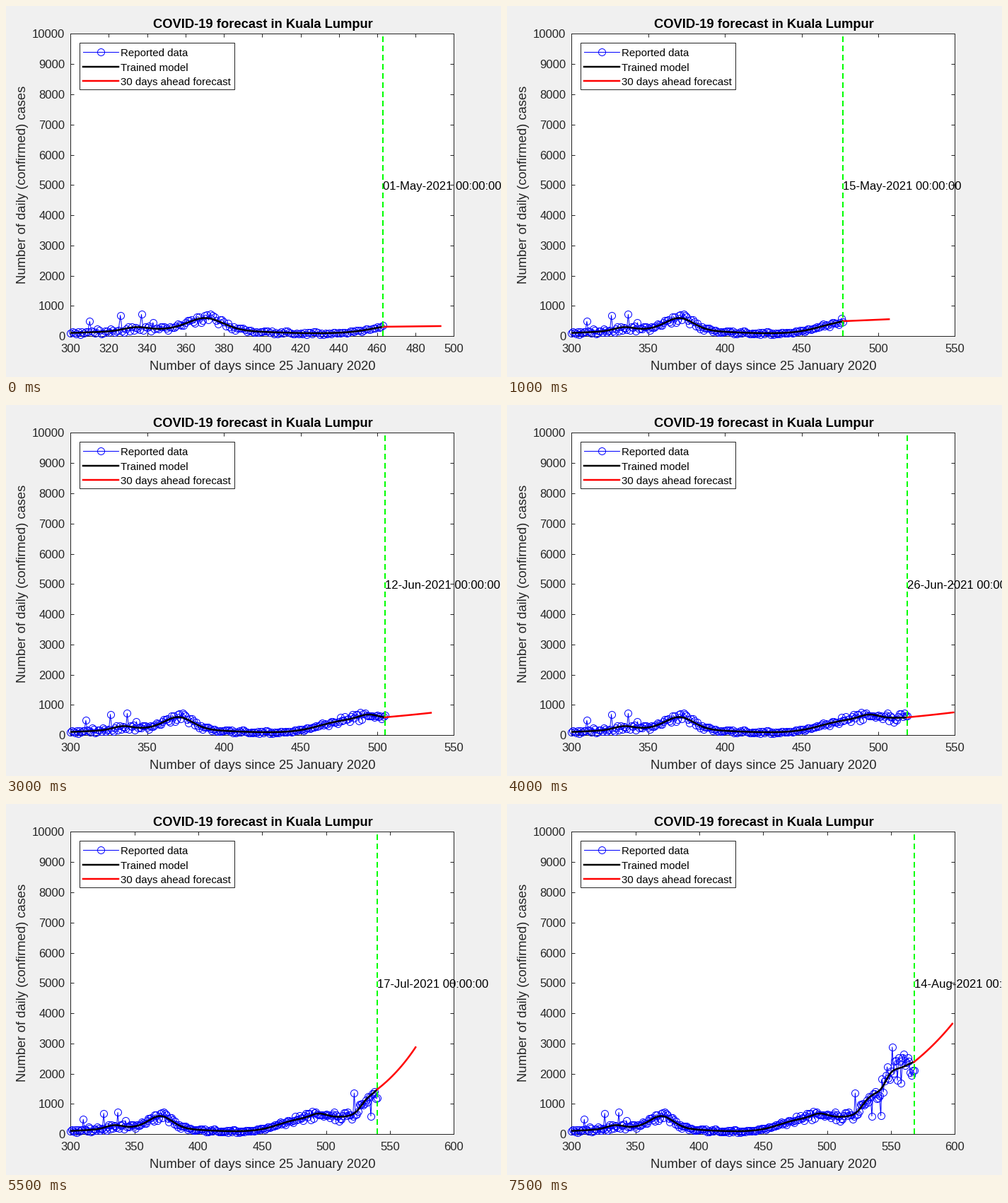
A matplotlib script for the animation above (8000 ms loop, 700 by 525 pixels).

```python
import numpy as np
import matplotlib.pyplot as plt
from matplotlib.animation import FuncAnimation
from matplotlib.patches import Rectangle

W, H, DPI = 700, 525, 100
PX = 72 / DPI
LEFT, RIGHT, TOP, BOTTOM = 91.2, 633.4, 39.375, 467.25
FIRST, START, STEP, FRAMES, AHEAD = 300, 463, 7, 16, 30
LAST = START + STEP * (FRAMES - 1)
LAG = 7
GRAY = "#262626"
MONTHS = "Jan Feb Mar Apr May Jun Jul Aug Sep Oct Nov Dec".split()

plt.rcParams["font.family"] = "Liberation Sans"


def hill(t, day, height, width):
    return height * np.exp(-0.5 * ((t - day) / width) ** 2)


def rise(t, day, height, width):
    return height / (1 + np.exp(-(t - day) / width))


def trend(t):
    """Smoothed daily cases: waves that pass and levels that stay."""
    waves = (hill(t, 358, 160, 34) + hill(t, 334, 105, 6)
             + hill(t, 370.5, 380, 9) + hill(t, 494, 130, 6))
    levels = (rise(t, 463, 500, 9) + rise(t, 528, 800, 3.5)
              + rise(t, 546, 800, 2.5) + rise(t, 563, 250, 3))
    return 70 + waves + levels


def fit(today):
    """Trained model up to today; its newest part runs on along the slope."""
    t = np.arange(FIRST, today + 1)
    knee = today - LAG
    slope = (trend(knee + 1) - trend(knee - 1)) / 2
    estimate = trend(knee) + slope * LAG
    bend = np.clip((t - knee) / LAG, 0, 1) ** 1.5
    return t, trend(t) + (estimate - trend(today)) * bend


def growth(day):
    """Factor by which cases grow over the forecast."""
    return np.interp(day, [463, 505, 526, 540, 554, 568],
                     [1.07, 1.25, 1.29, 1.94, 2.17, 1.53])


# Daily reports scatter around the trend, with a few outliers
days = np.arange(FIRST, LAST + 1)
rng = np.random.default_rng(19)
spread = 0.15 + hill(days, 310, 0.25, 20) + hill(days, 422, 0.15, 15)
noise = np.clip(rng.normal(size=days.size), -1.6, 1.6)
reports = np.maximum(trend(days) * (1 + spread * noise), 25)
OUTLIERS = {310: 490, 326: 690, 337: 720, 343: 450, 522: 1360,
            535: 600, 542: 610, 551: 2880}
for day, cases in OUTLIERS.items():
    reports[day - FIRST] = cases

fig = plt.figure(figsize=(W / DPI, H / DPI), dpi=DPI, facecolor="#f0f0f0")
ax = fig.add_axes([LEFT / W, 1 - BOTTOM / H, (RIGHT - LEFT) / W,
                   (BOTTOM - TOP) / H])
ax.set_ylim(0, 10000)
ax.set_yticks(range(0, 10001, 1000))
ax.set_axisbelow(True)
ax.tick_params(direction="in", top=True, right=True, length=5.4 * PX,
               width=PX, color=GRAY, labelcolor=GRAY, labelsize=16.67 * PX)
ax.tick_params(axis="x", pad=11 * PX)
ax.tick_params(axis="y", pad=8 * PX)
for spine in ax.spines.values():
    spine.set(color=GRAY, linewidth=PX, zorder=1)

# Overlay in pixel coordinates for labels and legend
top = fig.add_axes([0, 0, 1, 1], zorder=2)
top.set(xlim=(0, W), ylim=(H, 0))
top.axis("off")


def label(x, y, text, size, **kw):
    return top.text(x, y, text, fontsize=size * PX, va="baseline", **kw)


REPORT = dict(color="#0000ff", lw=PX, marker="o", ms=10 * PX, mfc="none",
              mew=PX)
MODEL = dict(color="black", lw=2.5 * PX)
FORECAST = dict(color="red", lw=2.5 * PX)

label(363, 31, "COVID-19 forecast in Kuala Lumpur", 18.33, ha="center",
      weight="bold")
label(362.5, 515, "Number of days since 25 January 2020", 18.33, ha="center",
      color=GRAY)
label(28, 253, "Number of daily (confirmed) cases", 18.33, ha="center",
      color=GRAY, rotation=90, rotation_mode="anchor")

top.add_patch(Rectangle((104, 52), 219, 66, fc="white", ec=GRAY, lw=PX))
rows = [("Reported data", REPORT), ("Trained model", MODEL),
        ("30 days ahead forecast", FORECAST)]
for i, (name, style) in enumerate(rows):
    y = 65 + 20.5 * i
    top.plot([109, 134, 159], [y] * 3, markevery=[1], **style)
    label(162.5, y + 6, name, 15)

report_line, = ax.plot([], [], clip_on=False, **REPORT)
model_line, = ax.plot([], [], **MODEL)
forecast_line, = ax.plot([], [], **FORECAST)
today_line, = ax.plot([], [], color="#00ff00", lw=2 * PX,
                      linestyle=(0, (4, 2.5)))
date_text = label(0, 260, "", 16.67)


def date_label(day):
    date = np.datetime64("2020-01-25") + np.timedelta64(day - 1, "D")
    year, month, dom = str(date).split("-")
    return f"{dom}-{MONTHS[int(month) - 1]}-{year} 00:00:00"


def draw(i):
    today = START + STEP * i
    end = today + AHEAD
    right = -(-end // 50) * 50
    ax.set_xticks(range(FIRST, right + 1, 20 if right <= 500 else 50))
    ax.set_xlim(FIRST, right)

    past, model = fit(today)
    report_line.set_data(past, reports[:past.size])
    model_line.set_data(past, model)

    u = np.linspace(0, 1, AHEAD + 1)
    forecast_line.set_data(today + AHEAD * u, model[-1] * growth(today) ** u)
    today_line.set_data([today, today], [0, 10000])

    x = LEFT + (RIGHT - LEFT) * (today - FIRST) / (right - FIRST)
    date_text.set_x(x)
    date_text.set_text(date_label(today))
    return report_line, model_line, forecast_line, today_line, date_text


anim = FuncAnimation(fig, draw, frames=FRAMES, interval=500, repeat=True,
                     repeat_delay=0, blit=False)
plt.show()
```
